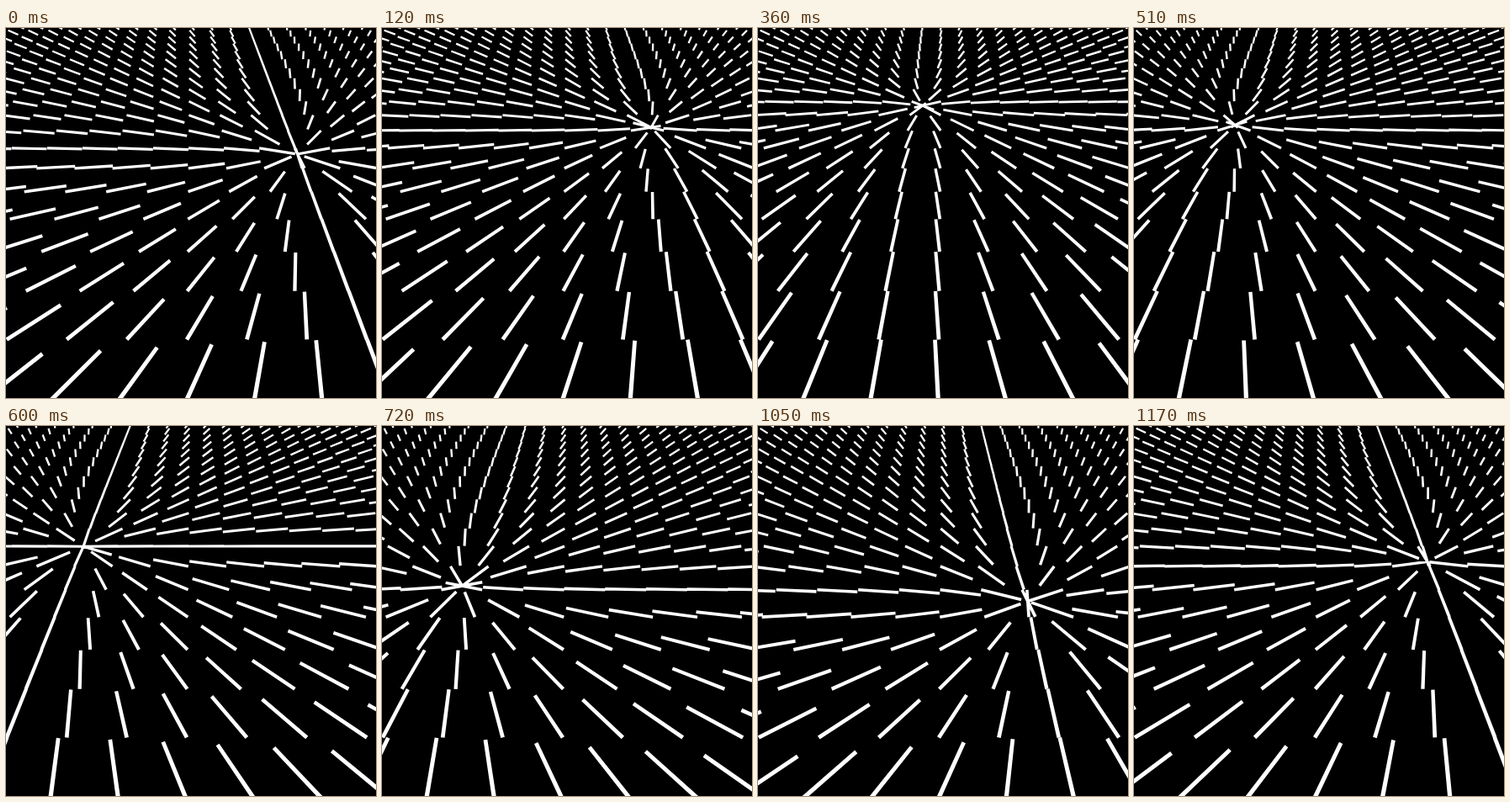
Animation of 440 by 440 pixels, one loop 1.2 s. Source, as an HTML page with a canvas:

```html
<!DOCTYPE html>
<html lang="en">
<head>
<meta charset="utf-8">
<title>Needle field</title>
<style>
  html, body { margin: 0; height: 100%; overflow: hidden; background: #000; }
  canvas { display: block; width: 440px; height: 440px; }
</style>
</head>
<body>
<canvas id="stage" width="440" height="440"></canvas>
<script>
const ctx = document.getElementById('stage').getContext('2d');
const STEP = 30, STEPS = 40;
const GRID_SHIFT = -0.07;
const CENTER = { u: -0.05, v: 5.75 }, RADIUS = 3;

// Tilted plane of unit cells to screen; half is half the line width there.
function project(u, v) {
  const s = 1 / (0.014006 + 0.00163 * v);
  return { x: 220 + u * s, y: s / 0.129 - 183, half: 0.45 + 0.027 * s };
}

function needle(u, v, focus) {
  const a = Math.atan2(focus.v - v, focus.u - u);
  const p = project(u, v);
  const q = project(u + Math.cos(a), v + Math.sin(a));
  const dx = q.x - p.x, dy = q.y - p.y, len = Math.hypot(dx, dy);
  const nx = -dy / len, ny = dx / len;
  ctx.moveTo(p.x + nx * p.half, p.y + ny * p.half);
  ctx.lineTo(q.x + nx * q.half, q.y + ny * q.half);
  ctx.lineTo(q.x - nx * q.half, q.y - ny * q.half);
  ctx.lineTo(p.x - nx * p.half, p.y - ny * p.half);
  ctx.closePath();
}

function draw(time) {
  const i = Math.floor(time / STEP) % STEPS;
  const angle = 0.16 * ((i + STEPS - 1) % STEPS) + 0.023;
  const focus = {
    u: CENTER.u + RADIUS * Math.cos(angle),
    v: CENTER.v + RADIUS * Math.sin(angle)
  };
  ctx.fillStyle = '#000';
  ctx.fillRect(0, 0, 440, 440);
  ctx.fillStyle = '#fff';
  ctx.beginPath();
  for (let v = -3; v <= 21; v++)
    for (let k = -13; k <= 13; k++) needle(k + GRID_SHIFT, v, focus);
  ctx.fill();
}

let start;
function tick(now) {
  start ??= now;
  draw(Math.max(0, now - start));
  requestAnimationFrame(tick);
}
draw(0);
requestAnimationFrame(tick);
</script>
</body>
</html>
```
